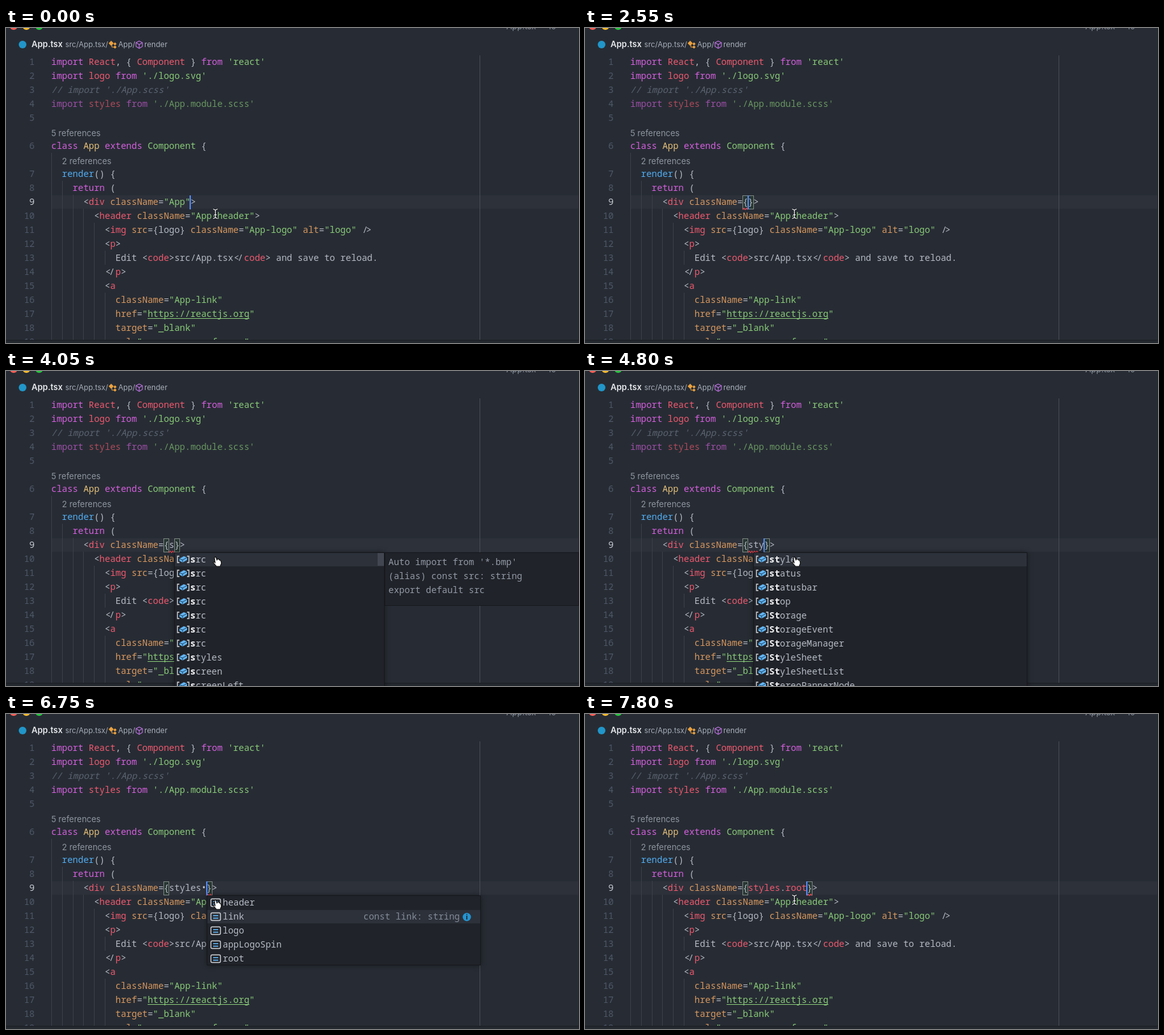
An HTML page with a canvas that plays this animation: 899x495 px, repeating every 8000 ms.

```html
<!DOCTYPE html>
<html lang="en">
<head>
<meta charset="utf-8">
<title>Code editor completion</title>
<style>
  html, body { margin: 0; width: 100%; height: 100%; overflow: hidden; background: #272c34; }
  canvas { display: block; }
</style>
</head>
<body>
<canvas width="899" height="495"></canvas>
<script>
const ctx = document.querySelector('canvas').getContext('2d');
const LOOP = 8000, LEFT = 71, CHAR = 8.4, LINE = 22, TOP = 42, EDIT_ROW = 10;
const MONO = '"Noto Sans Mono", "DejaVu Sans Mono", monospace';
const SANS = 'Inter, Roboto, sans-serif';
const COLORS = {
  p: '#d55fde', r: '#ef596f', g: '#89ca78', w: '#b4b9c3',
  y: '#e5c07b', b: '#52adf2', o: '#d8985f', c: '#5c6370'
};

// "~x" switches to the colour named x; null leaves a row for a reference count.
const LINES = [
  "~pimport ~rReact~w, { ~rComponent~w } ~pfrom ~g'react'",
  "~pimport ~rlogo ~pfrom ~g'./logo.svg'",
  "~c// import './App.scss'",
  "~pimport ~rstyles ~pfrom ~g'./App.module.scss'",
  '',
  null,
  '~pclass ~yApp ~pextends ~gComponent ~w{',
  null,
  '  ~brender~w() {',
  '    ~preturn ~w(',
  '',
  '        ~w<~rheader ~oclassName~w=~g"App-header"~w>',
  '          ~w<~rimg ~osrc~w={logo} ~oclassName~w=~g"App-logo" ~oalt~w=~g"logo" ~w/>',
  '          ~w<~rp~w>',
  '            ~wEdit <~rcode~w>src/App.tsx</~rcode~w> and save to reload.',
  '          ~w</~rp~w>',
  '          ~w<~ra',
  '            ~oclassName~w=~g"App-link"',
  '            ~ohref~w=~g"https://reactjs.org"',
  '            ~otarget~w=~g"_blank"',
  '            ~orel~w=~g"noopener noreferrer"'
];

const MENUS = {
  s: { x: 264, width: 330, typed: 1, scroll: true, icon: variableIcon,
    rows: [...Array(7).fill('src'), 'styles', 'screen', 'screenLeft'] },
  st: { x: 264, width: 430, typed: 2, icon: variableIcon,
    rows: ['styles', 'status', 'statusbar', 'stop', 'Storage', 'StorageEvent',
      'StorageManager', 'StyleSheet', 'StyleSheetList', 'StereoPannerNode'] },
  members: { x: 315, width: 430, typed: 0, icon: constantIcon,
    rows: ['header', 'link', 'logo', 'appLogoSpin', 'root'] }
};

// Each step changes only the listed parts of the state.
const STEPS = [
  [0, { value: '~g"App"', caret: 26, on: true, dim: true, row: 0 }],
  [150, { on: false }],
  [600, { on: true, caret: 25, anchor: 26 }],
  [750, { caret: 24 }],
  [900, { caret: 23 }],
  [1050, { caret: 22 }],
  [1350, { caret: 21 }],
  [1650, { value: '', anchor: null }],
  [2100, { on: false }],
  [2250, { value: '~w{}', on: true, caret: 22 }],
  [2400, { close: 22 }],
  [2550, { error: [21, 22] }],
  [3000, { on: false }],
  [3450, { value: '~w{s}', on: true, caret: 23, close: 23, error: [22, 23] }],
  [3600, { menu: 's' }],
  [3750, { hand: true }],
  [3900, { details: true }],
  [4050, { on: false }],
  [4350, { value: '~w{st}', on: true, caret: 24, close: 24, menu: 'st', details: false }],
  [4500, { error: [22, 24] }],
  [4800, { value: '~w{sty}', caret: 25, close: 25 }],
  [5100, { value: '~w{styles}', caret: 28, close: 28, menu: null }],
  [5250, { hand: false }],
  [5700, { value: '~w{styles•}', caret: 29, close: 29, menu: 'members', hand: true }],
  [5850, { hint: true }],
  [6000, { dim: false, error: [29, 30] }],
  [6150, { on: false }],
  [6600, { on: true, row: 1, hint: false }],
  [6750, { hint: true }],
  [6900, { row: 2, hint: false }],
  [7050, { row: 4 }],
  [7200, { hint: true }],
  [7650, { value: '~w{~rstyles~w.~rroot~w}', caret: 33, close: 33, error: [33, 34], menu: null }],
  [7800, { hand: false }]
];

const colX = col => LEFT + col * CHAR;
const rowY = row => TOP + row * LINE;

function rect(x, y, w, h, color) {
  ctx.fillStyle = color;
  ctx.fillRect(x, y, w, h);
}

function circle(x, y, r, color) {
  ctx.fillStyle = color;
  ctx.beginPath();
  ctx.arc(x, y, r, 0, 7);
  ctx.fill();
}

function path(points, { fill, stroke, width = 1, close = true }) {
  ctx.beginPath();
  points.forEach(([x, y]) => ctx.lineTo(x, y));
  if (close) ctx.closePath();
  ctx.lineWidth = width;
  if (fill) { ctx.fillStyle = fill; ctx.fill(); }
  if (stroke) { ctx.strokeStyle = stroke; ctx.stroke(); }
}

function label(text, x, y, size, color, weight = 400) {
  ctx.font = `${weight} ${size}px ${SANS}`;
  ctx.fillStyle = color;
  ctx.fillText(text, x, y);
}

// Places characters on the fixed grid and tightens "</" and "/>" pairs.
function mono(text, x, y, color, style = '') {
  ctx.font = `${style} 14px ${MONO}`;
  ctx.fillStyle = color;
  [...text].forEach((char, i) => {
    const next = text[i + 1], previous = text[i - 1];
    let shift = 0;
    if (char + next === '</' || char + next === '/>') shift = 1;
    if (previous + char === '</' || previous + char === '/>') shift = -1.5;
    ctx.fillText(char, x + i * CHAR + shift, y);
  });
}

function code(markup, row, startCol = 0) {
  const [indent, ...parts] = markup.split('~');
  let col = startCol + indent.length;
  for (const part of parts) {
    const text = part.slice(1);
    mono(text, colX(col), rowY(row) + 16, COLORS[part[0]], part[0] === 'c' ? 'italic' : '');
    col += text.length;
  }
}

function header() {
  ['#ff5f57', '#febc2e', '#28c840'].forEach((color, i) => circle(12 + i * 20, -3, 6, color));
  label('App.tsx — lo', 785, 2, 13, '#8b919c');

  circle(26, 26, 6, '#2196c9');
  label('App.tsx', 40, 30, 13, '#e6e8ec', 600);
  label('src/App.tsx/', 93, 30, 11.7, '#a5abb6');
  label('App/', 176, 30, 11.7, '#a5abb6');
  label('render', 217, 30, 11.7, '#a5abb6');

  const diamond = (x, y, r) =>
    path([[x, y - r], [x + r, y], [x, y + r], [x - r, y]], { fill: '#eca23f' });
  diamond(165, 24, 4);
  diamond(171, 25, 2.5);
  diamond(171, 30, 2.5);
  path([[166, 25], [166, 30], [171, 30]], { stroke: '#eca23f', close: false });

  const purple = { stroke: '#b86fdc', width: 1.2 };
  path([[209, 20.5], [214, 23], [214, 29], [209, 32], [204, 29], [204, 23]], purple);
  path([[204, 23], [209, 26], [214, 23]], { ...purple, close: false });
  path([[209, 26], [209, 32]], { ...purple, close: false });
}

function guides() {
  const guide = (col, from, to) =>
    rect(Math.round(colX(col)), rowY(from), 1, rowY(to) - rowY(from), '#3a3f48');
  [[0, 7], [2, 9], [4, 10], [6, 11], [8, 12]].forEach(([col, from]) => guide(col, from, 21));
  guide(10, 14, 15);
  guide(10, 17, 21);
  rect(743, 43, 1, 447, '#484d56');
}

function squiggle([from, to]) {
  const points = [];
  for (let x = colX(from), i = 0; x <= colX(to); x += 2, i++) points.push([x, i % 2 ? 283 : 285.5]);
  path(points, { stroke: '#e8404a', width: 1.2, close: false });
}

function editLine(state) {
  const y = rowY(EDIT_ROW) + 1;
  if (state.anchor) rect(colX(state.caret), y, (state.anchor - state.caret) * CHAR, 22, '#414855');
  if (state.close) {
    for (const col of [21, state.close]) {
      const x = Math.round(colX(col)) + 0.5;
      ctx.fillStyle = 'rgba(0, 100, 0, .12)';
      ctx.strokeStyle = '#7f8883';
      ctx.lineWidth = 1;
      ctx.fillRect(x, y + 0.5, 8, 21);
      ctx.strokeRect(x, y + 0.5, 8, 21);
    }
  }
  code(`      ~w<~rdiv ~oclassName~w=${state.value}~w>`, EDIT_ROW);
  if (state.error) squiggle(state.error);
  if (state.on) rect(Math.round(colX(state.caret)) - 1, y, 2, 22, '#528bff');
}

function editor(state) {
  ctx.save();
  ctx.beginPath();
  ctx.rect(0, 0, 899, 490);
  ctx.clip();
  rect(LEFT, 263, 828, 21, '#2d313a');
  guides();
  let number = 0;
  LINES.forEach((line, row) => {
    if (line === null) {
      const [text, col] = row === 5 ? ['5 references', 0] : ['2 references', 2];
      label(text, colX(col), rowY(row) + 18, 13, '#8f959f');
      return;
    }
    const digits = String(++number);
    mono(digits, 45 - digits.length * CHAR, rowY(row) + 16, row === EDIT_ROW ? '#c5c9d1' : '#4f5868');
    ctx.globalAlpha = row === 3 && state.dim ? 0.67 : 1;
    code(line, row);
    ctx.globalAlpha = 1;
  });
  rect(colX(18), rowY(18) + 18, 19 * CHAR, 1, COLORS.g);
  editLine(state);
  ctx.restore();
  rect(0, 490, 899, 1, '#1b1e24');
  rect(0, 491, 899, 4, '#23272e');
  rect(898, 0, 1, 490, '#20242b');
}

function variableIcon(x, y) {
  const bracket = { stroke: '#d0d3d8', width: 1.4, close: false };
  path([[x + 8, y - 5], [x + 5, y - 5], [x + 5, y + 5], [x + 8, y + 5]], bracket);
  path([[x + 20, y - 5], [x + 23, y - 5], [x + 23, y + 5], [x + 20, y + 5]], bracket);
  path([[x + 8, y - 1], [x + 15, y - 5], [x + 20, y - 3], [x + 20, y + 1], [x + 13, y + 5], [x + 8, y + 2]],
    { fill: '#62b5f5' });
  path([[x + 8, y - 1], [x + 13, y + 1], [x + 20, y - 3]], { stroke: '#20415d', close: false });
  path([[x + 13, y + 1], [x + 13, y + 5]], { stroke: '#20415d', close: false });
}

function constantIcon(x, y) {
  ctx.strokeStyle = '#d0d3d8';
  ctx.lineWidth = 1.4;
  ctx.beginPath();
  ctx.roundRect(x + 6.5, y - 5.5, 15, 12, 2);
  ctx.stroke();
  rect(x + 10, y - 2, 8, 1.6, '#62b5f5');
  rect(x + 10, y + 2, 8, 1.6, '#62b5f5');
}

function panel(x, y, w, h) {
  rect(x, y, w, h, '#202329');
  ctx.strokeStyle = '#16181d';
  ctx.lineWidth = 1;
  ctx.strokeRect(x + 0.5, y + 0.5, w - 1, h - 1);
}

function popup(state) {
  const { x, width, typed, rows, icon, scroll } = MENUS[state.menu];
  const top = 285;
  ctx.save();
  ctx.shadowColor = 'rgba(0, 0, 0, .45)';
  ctx.shadowBlur = 8;
  rect(x, top, width, rows.length * LINE, '#202329');
  ctx.restore();
  panel(x, top, width, rows.length * LINE);
  rect(x + 1, top + 1 + state.row * LINE, width - 2, LINE - 1, '#2c313a');
  if (scroll) rect(583, 286, 10, 20, '#414650');

  rows.forEach((name, i) => {
    const y = top + i * LINE + 16;
    icon(x, y - 5);
    mono(name.slice(0, typed), x + 25, y, '#f2f3f5', 'bold');
    mono(name.slice(typed), x + 25 + typed * CHAR, y, '#b6bbc5');
  });

  if (state.hint) {
    const text = `const ${rows[state.row]}: string`;
    const y = top + state.row * LINE + 16;
    mono(text, 712 - text.length * CHAR, y, '#858c98');
    circle(723, y - 4, 6.5, '#2594d0');
    label('i', 721.5, y, 11, '#202329', 700);
  }
  if (state.details) {
    panel(594, top, 305, 84);
    ["Auto import from '*.bmp'", '(alias) const src: string', 'export default src']
      .forEach((text, i) => mono(text, 600, 305 + i * LINE, '#9299a5'));
  }
}

function pointer(hand) {
  if (hand) {
    const shape = [[327, 293], [329, 292], [331, 297], [332, 295], [334, 296], [335, 297], [337, 298],
      [338, 302], [336, 307], [330, 307], [325, 301], [327, 300], [328, 301]];
    path(shape, { fill: '#fff', stroke: '#111', width: 1.2 });
    return;
  }
  const beam = [[325, 284.5], [328.5, 286], [332, 284.5]];
  const foot = beam.map(([x, y]) => [x, 584 - y]);
  for (const [stroke, width] of [['#15181d', 2.6], ['#f4f4f4', 1.2]]) {
    const line = { stroke, width, close: false };
    path(beam, line);
    path(foot, line);
    path([[328.5, 286], [328.5, 298]], line);
    path([[326.5, 293.5], [330.5, 293.5]], line);
  }
}

function draw(now) {
  const time = now % LOOP;
  const state = Object.assign({}, ...STEPS.filter(([at]) => at <= time).map(([, change]) => change));
  rect(0, 0, 899, 495, '#272c34');
  header();
  editor(state);
  if (state.menu) popup(state);
  pointer(state.hand);
}

const start = performance.now();
function tick() {
  draw(performance.now() - start);
  requestAnimationFrame(tick);
}
tick();
</script>
</body>
</html>
```
